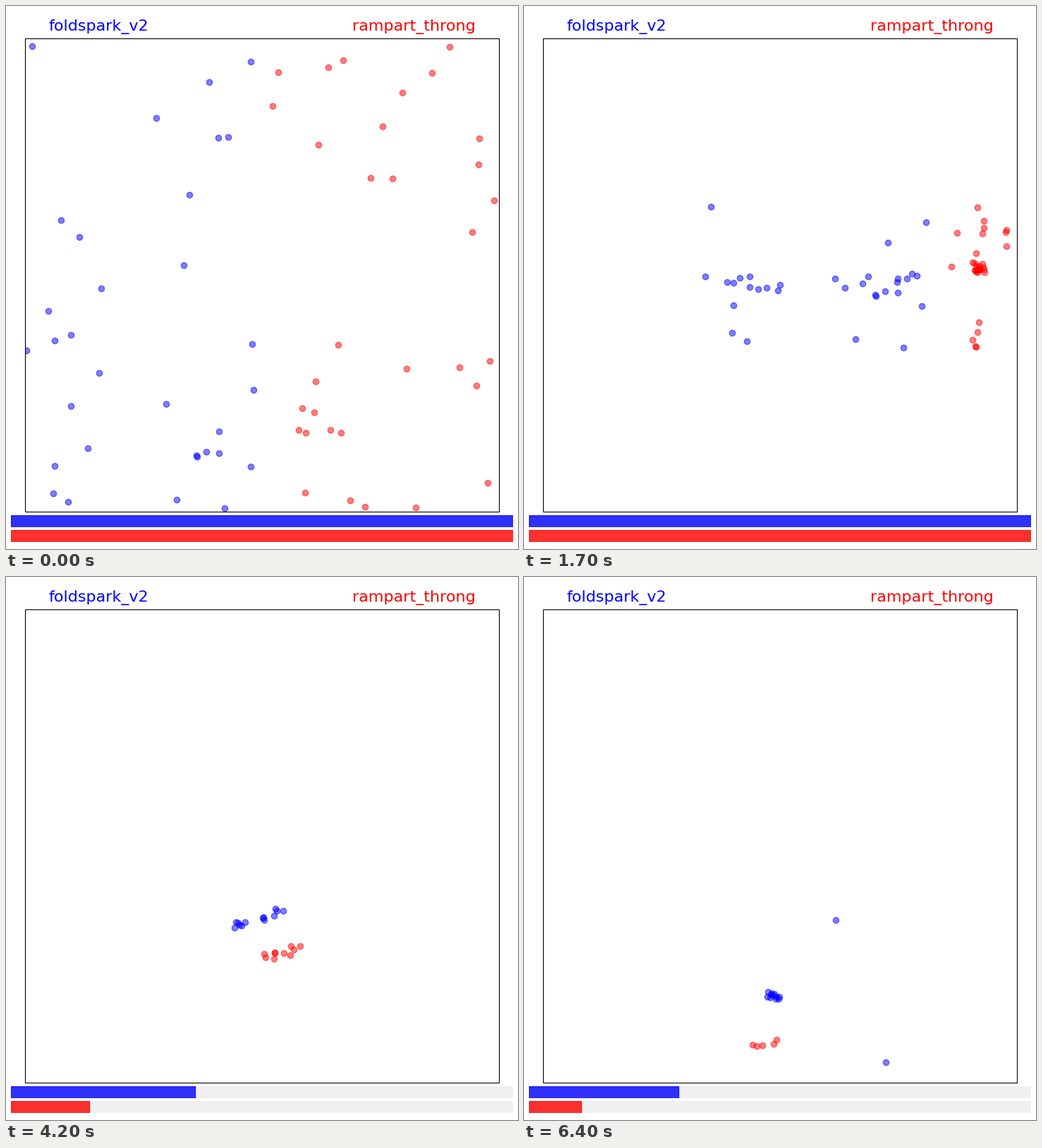
Animation of 726 by 771 pixels, one loop 6450 ms. Source, as a matplotlib script:

```python
import matplotlib.pyplot as plt
import numpy as np
from matplotlib.animation import FuncAnimation
from matplotlib.patches import Rectangle

W, H, DPI = 726, 771, 100
FRAMES, INTERVAL = 129, 50
LEFT, TOP, SIDE = 27, 46, 672
STEP = SIDE / 100  # top speed per axis and frame
FAR = 9999
GOLDEN = 0.618034
rng = np.random.default_rng(5)

BLUE = [
    (37, 57), (347, 79), (288, 108), (213, 159), (301, 187), (315, 186),
    (260, 268), (78, 304), (104, 328), (252, 368), (135, 401), (60, 433),
    (69, 475), (92, 467), (29, 489), (132, 521), (92, 568), (116, 628),
    (69, 653), (67, 692), (88, 704), (242, 701), (310, 713), (227, 565),
    (270, 638), (271, 640), (284, 633), (302, 635), (302, 604), (347, 654),
    (351, 545), (349, 480),
]
RED = [
    (629, 58), (478, 77), (457, 87), (386, 94), (604, 95), (562, 123),
    (378, 142), (534, 171), (671, 188), (443, 197), (670, 225), (517, 244),
    (548, 245), (692, 276), (661, 321), (471, 481), (568, 515), (686, 504),
    (643, 513), (667, 539), (439, 533), (420, 571), (437, 577), (415, 602),
    (425, 606), (460, 602), (475, 606), (683, 677), (424, 691), (488, 702),
    (509, 711), (581, 712),
]

# Stages of a flight: end frame, meeting point x and y, half length of the flock
SWEEP = [(16, FAR, 491, 0, 8), (34, 565, 392, 12, 10)]
REGROUP = [(100, 356, 518, 9, 5), (FRAMES, 354, 598, 9, 3)]
FRONT = SWEEP + [(46, 560, 385, 20, 6), (59, 496, 384, 20, 3),
                 (84, 372, 480, 22, -11)] + REGROUP
REAR = SWEEP + [(46, 200, 402, 20, 4), (59, 180, 405, 5, 0),
                (84, 333, 494, 5, 0)] + REGROUP
GATHER = (16, 548, 412, 20, 0)
PACK = [GATHER, (34, 645, 370, 4, 0), (46, 615, 385, 10, 6),
        (59, 534, 433, 14, -11), (84, 390, 533, 28, -3),
        (100, 358, 575, 38, 0), (FRAMES, 344, 668, 12, -4)]
RUNNERS = [GATHER, (34, 690, 328, 6, 8), (52, FAR, 398, 0, 0)]
STRAYS = {1: (104, 520, 701), 2: (114, 457, 482)}  # rank: departure, goal

# Agents alive and right edge of the health bar over time
BLUE_ALIVE = [(42, 32), (58, 14), (70, 13)]
RED_ALIVE = [(42, 32), (58, 11), (70, 10), (92, 9), (104, 9), (117, 5)]
BLUE_BAR = [(40, 719), (52, 600), (59, 295), (84, 268), (100, 244), (128, 219)]
RED_BAR = [(40, 719), (52, 440), (59, 120), (68, 95), (84, 118), (87, 106),
           (100, 114), (110, 74), (128, 81)]


def at(frame, keys):
    return np.interp(frame, *zip(*keys))


def fly(start, plan, rank, noise, alive, stray=None):
    """Pace an agent from goal to goal, never above top speed."""
    u = 2 * (rank * GOLDEN % 1) - 1
    goals = [(end, (x + u * dx, y + u * dy) + rng.uniform(-noise, noise, 2))
             for end, x, y, dx, dy in plan]
    pos = np.array(start, float)
    track = np.full((FRAMES, 2), np.nan)
    for f in range(FRAMES):
        stage = next((g for g in goals if g[0] > f), None)
        if stage is None or rank >= at(f, alive):
            break
        if stray and f >= stray[0]:
            stage = FRAMES, np.array(stray[1:])
        track[f] = pos
        end, goal = stage
        pos += np.clip((goal - pos) / (end - f), -STEP, STEP)
    track[:, 0] = (track[:, 0] - LEFT) % SIDE + LEFT
    return track


def blue_plan(x, y):
    return FRONT if x > 200 else REAR


def red_plan(x, y):
    return RUNNERS if x > 665 and y < 300 else PACK


def team(starts, choose, noise, alive, strays):
    ranks = [i * 19 % len(starts) for i in range(len(starts))]
    return np.array([fly(s, choose(*s), r, noise, alive, strays.get(r))
                     for s, r in zip(starts, ranks)])


fig = plt.figure(figsize=(W / DPI, H / DPI), dpi=DPI, facecolor="white")
ax = fig.add_axes((0, 0, 1, 1))
ax.set(xlim=(0, W), ylim=(H, 0))
ax.axis("off")

arena = Rectangle((LEFT, TOP), SIDE, SIDE, fc="none", ec="black", lw=0.8, zorder=3)
ax.add_patch(arena)


def label(x, text, color, ha):
    ax.text(x, 35, text, color=color, ha=ha, va="baseline",
            fontsize=16, family="DejaVu Sans")


label(LEFT + 0.05 * SIDE, "foldspark_v2", "blue", "left")
label(LEFT + 0.95 * SIDE, "rampart_throng", "red", "right")


def dots(color):
    line, = ax.plot([], [], "o", color=color, ms=6, mew=1, alpha=0.5)
    line.set_clip_path(arena)
    return line


def bar(y, color):
    box = (7, y), 712, 17
    back = ax.add_patch(Rectangle(*box, fc="#f0f0f0", lw=0))
    fill = ax.add_patch(Rectangle(*box, color=color, alpha=0.8, lw=1))
    fill.set_clip_path(back)
    return fill


teams = [
    (dots("blue"), team(BLUE, blue_plan, 4, BLUE_ALIVE, STRAYS),
     bar(723, "blue"), BLUE_BAR),
    (dots("red"), team(RED, red_plan, 8, RED_ALIVE, {}),
     bar(744, "red"), RED_BAR),
]


def update(frame):
    for line, tracks, fill, health in teams:
        line.set_data(*tracks[:, frame].T)
        fill.set_width(at(frame, health) - fill.get_x())
    return [part for line, _, fill, _ in teams for part in (line, fill)]


anim = FuncAnimation(fig, update, frames=FRAMES, interval=INTERVAL,
                     repeat=True, repeat_delay=0)
plt.show()
```
